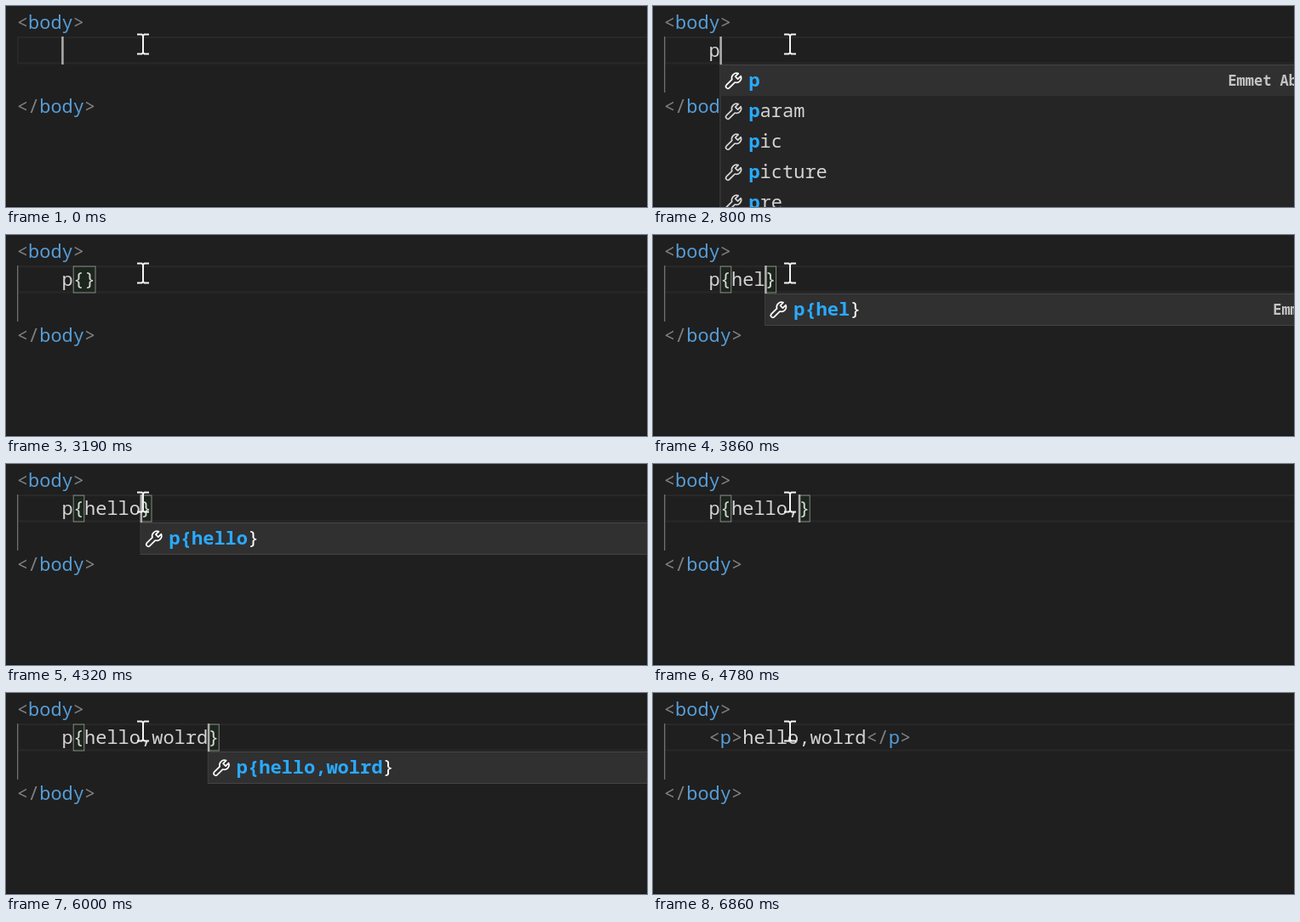
An HTML page that plays this animation: 753 px wide and 237 px high, repeating every 7320 ms.

```html
<!DOCTYPE html>
<html lang="en">
<head>
<meta charset="utf-8">
<title>Typing an abbreviation</title>
<style>
  html, body { margin: 0; width: 100%; height: 100%; overflow: hidden; background: #1f1f1f; }
  svg { display: block; width: 753px; height: 237px; }
  text { font: 22px "Noto Sans Mono", "DejaVu Sans Mono", monospace; white-space: pre; fill: #d4d4d4; font-variant-ligatures: none; }
  .punct { fill: #808080; }
  .tag { fill: #569cd6; }
  .match { fill: #2aaaff; font-weight: 700; }
  .focus { fill: #fff; }
  .detail { font-size: 17px; font-weight: 600; fill: #c4c4c4; }
  .icon { fill: none; stroke: #d4d4d4; stroke-width: 1.25; stroke-linejoin: round; }
  .icon.focus { fill: none; stroke: #fff; }
  .bracket { fill: #006400; fill-opacity: .1; stroke: #888; }
</style>
</head>
<body>
<svg viewBox="0 0 753 237">
  <rect width="753" height="237" fill="#1f1f1f"/>
  <rect y="236" width="753" height="1" fill="#15171e"/>
  <rect x="14" y="37" width="760" height="30.5" fill="none" stroke="#282828" stroke-width="2"/>
  <rect id="guide" x="13" y="36" width="1.3" height="66" fill="#707070"/>
  <g id="brackets"></g>
  <text x="12.8" y="27"><tspan class="punct">&lt;</tspan><tspan class="tag">body</tspan><tspan class="punct">&gt;</tspan></text>
  <text id="line" x="65.6" y="60"></text>
  <text x="12.8" y="126"><tspan class="punct">&lt;/</tspan><tspan class="tag">body</tspan><tspan class="punct">&gt;</tspan></text>
  <rect id="caret" y="36" width="2.5" height="33" fill="#aeafad"/>
  <g id="popup"></g>
  <path d="M154 33.5H159.5L161 35L162.5 33.5H168M161 35V55M154 56.5H159.5L161 55L162.5 56.5H168" fill="none" stroke="#f4f4f4" stroke-width="2"/>
</svg>
<script>
const LOOP = 7320, CELL = 13.2, ROW = 36;
const WRENCH = "M12 1.9A4 4 0 0 0 6.7 6.9L2 11.6A1.7 1.7 0 0 0 4.4 14L9.1 9.3A4 4 0 0 0 14.1 4L11.6 6.5L9.5 4.4Z";
const P_ITEMS = ["p", "param", "pic", "picture", "pre"];
const DONE = "<p>hello,wolrd</p>";

// start time, text before the caret, suggestion stem, caret shown
const STEPS = [
  [0, "", "", 1],
  [270, "", "", 0],
  [800, "p", "p", 1],
  [1260, "p", "p", 0],
  [1660, "p{", "", 1],
  [2200, "p{", "", 0],
  [2660, "p{", "", 1],
  [3190, "p{", "", 0],
  [3320, "p{h", "p{h", 1],
  [3590, "p{he", "p{he", 1],
  [3860, "p{hel", "p{hel", 1],
  [4120, "p{hell", "p{hell", 1],
  [4320, "p{hello", "p{hello", 1],
  [4780, "p{hello,", "", 1],
  [4980, "p{hello,w", "", 1],
  [5050, "p{hello,w", "p{hello,w", 1],
  [5130, "p{hello,wo", "p{hello,wo", 1],
  [5460, "p{hello,wol", "p{hello,wol", 1],
  [5720, "p{hello,wolr", "p{hello,wol", 1],
  [5790, "p{hello,wolr", "p{hello,wolr", 1],
  [6000, "p{hello,wolrd", "p{hello,wolrd", 1],
  [6400, DONE, "", 1],
  [6860, DONE, "", 0]
];
const BRACKETS_FROM = 1730;

const byId = id => document.getElementById(id);
const guide = byId("guide"), brackets = byId("brackets"), line = byId("line");
const caret = byId("caret"), popup = byId("popup");
const col = n => 12.4 + CELL * (n + 4);
const span = (cls, s) => `<tspan class="${cls}">${s}</tspan>`;

function lineMarkup(typed) {
  if (typed === DONE) {
    return span("punct", "&lt;") + span("tag", "p") + span("punct", "&gt;") + "hello,wolrd" +
      span("punct", "&lt;/") + span("tag", "p") + span("punct", "&gt;");
  }
  return typed.includes("{") ? typed + "}" : typed;
}

function bracketBox(from, cells) {
  return `<rect class="bracket" x="${col(from) + .8}" y="37" width="${CELL * cells - .6}" height="31"/>`;
}

function bracketMarkup(typed) {
  const close = typed.length;
  return close === 2 ? bracketBox(1, 2) : bracketBox(1, 1) + bracketBox(close, 1);
}

function popupMarkup(stem) {
  if (!stem) return "";
  const items = stem === "p" ? P_ITEMS : [stem + "}"];
  const x = col(stem.length);
  const height = items.length * ROW + 1;
  let out = `<rect x="${x + .5}" y="69.5" width="800" height="${height}" fill="#252526" stroke="#454545"/>` +
    `<rect x="${x + 1}" y="70" width="799" height="${ROW}" fill="#303031"/>`;
  items.forEach((item, i) => {
    const cls = i ? "" : "focus", y = i * ROW;
    out += `<path class="icon ${cls}" transform="translate(${x + 5} ${77 + y}) scale(1.4)" d="${WRENCH}"/>` +
      `<text class="${cls}" x="${x + 34}" y="${95 + y}">` +
      span("match", stem) + item.slice(stem.length) + "</text>";
  });
  return out + `<text class="detail" x="${x + 597}" y="94">Emmet Abbreviation</text>`;
}

let shown = "";
function render(t) {
  const index = STEPS.findLastIndex(s => s[0] <= t);
  const [, typed, stem, caretOn] = STEPS[index];
  const matched = t >= BRACKETS_FROM && typed !== DONE;
  const key = index + ":" + matched;
  if (key === shown) return;
  shown = key;
  guide.style.display = typed ? "" : "none";
  line.innerHTML = lineMarkup(typed);
  brackets.innerHTML = matched ? bracketMarkup(typed) : "";
  popup.innerHTML = popupMarkup(stem);
  caret.setAttribute("x", col(typed.length));
  caret.style.display = caretOn ? "" : "none";
}

const start = performance.now();
function tick() {
  render((performance.now() - start) % LOOP);
  requestAnimationFrame(tick);
}
tick();
</script>
</body>
</html>
```
